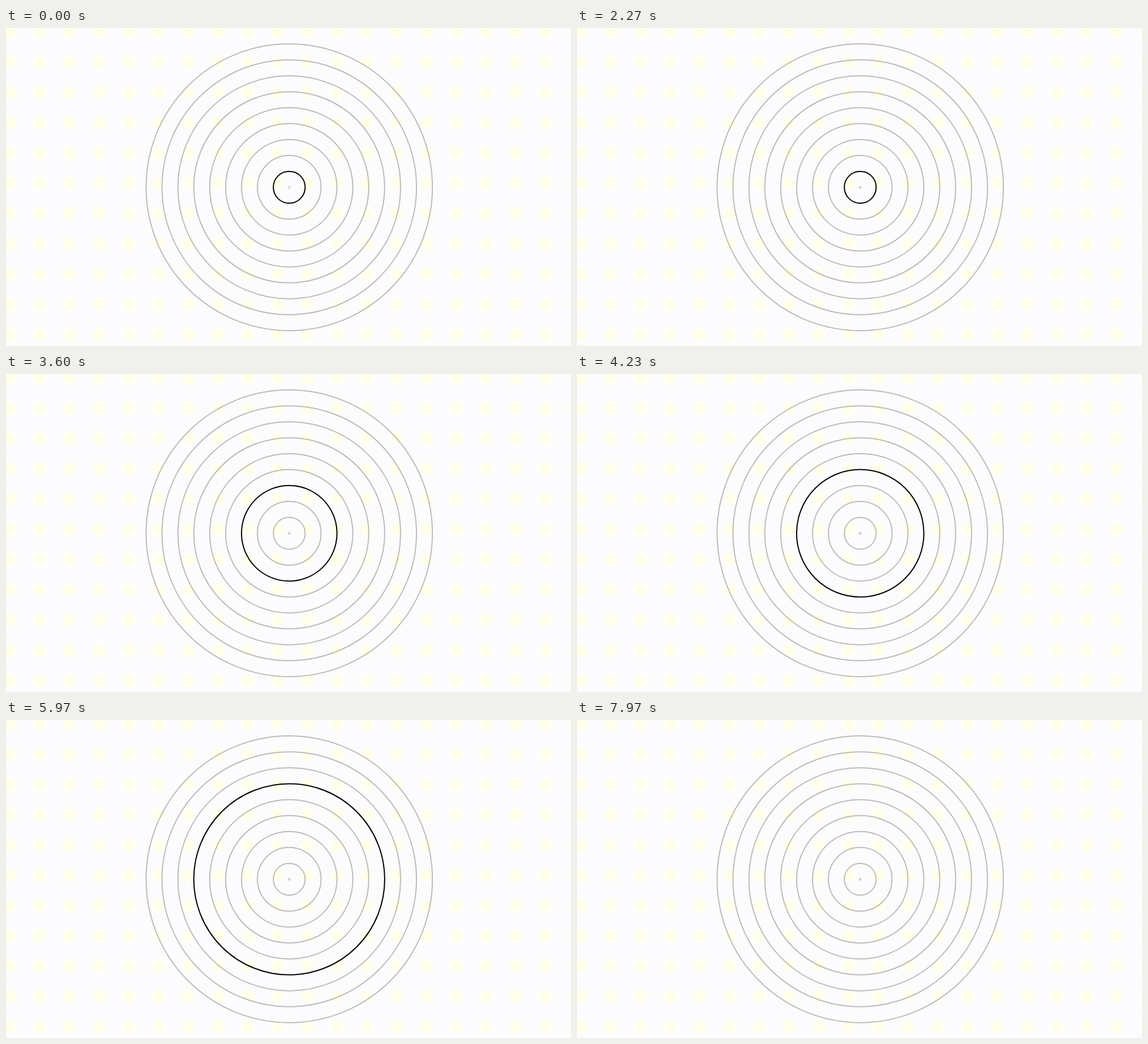
An HTML page for the animation above (8000 ms loop, 998x561 px).

```html
<!DOCTYPE html>
<html lang="en">
<head>
<meta charset="utf-8">
<title>Concentric rings</title>
<style>
  html, body { margin: 0; width: 100%; height: 100%; overflow: hidden; }
  body {
    background: radial-gradient(circle closest-side, #ffffea 0 28%, #fffff0 38%, #fcfcfe 54%) -19px -19.5px / 52.57px 53.4px #fcfcfe;
  }
  svg { display: block; width: 998px; height: 561px; }
  .ring { fill: none; stroke: #bcbcbf; stroke-width: 2; }
  .ring.lit { stroke: #000; }
</style>
</head>
<body>
<svg viewBox="0 0 998 561">
  <g id="rings" transform="translate(500.3 281)">
    <circle r="2.6" fill="#d6d6d8"/>
    <circle id="core" r="1.1"/>
  </g>
</svg>
<script>
  const LOOP = 8000, BEAT = 2500 / 3, GAP = 28.1, COUNT = 9;
  const group = document.getElementById("rings");
  const core = document.getElementById("core");

  const rings = Array.from({ length: COUNT }, (_, i) => {
    const ring = document.createElementNS(group.namespaceURI, "circle");
    ring.setAttribute("r", GAP * (i + 1));
    ring.setAttribute("class", "ring");
    return group.appendChild(ring);
  });

  // The highlight steps in to the centre, then outwards, then rests.
  function litRing(time) {
    const beat = Math.floor(time / BEAT);
    return beat < COUNT ? Math.abs(beat - 1) : -1;
  }

  function draw(now) {
    const time = now % LOOP;
    const lit = litRing(time);
    rings.forEach((ring, i) => ring.classList.toggle("lit", i + 1 === lit));
    core.setAttribute("fill", lit === 0 ? "#000" : time < BEAT ? "#f6f6f6" : "#cacacc");
  }

  const start = performance.now();
  function tick() {
    draw(performance.now() - start);
    requestAnimationFrame(tick);
  }
  tick();
</script>
</body>
</html>
```
